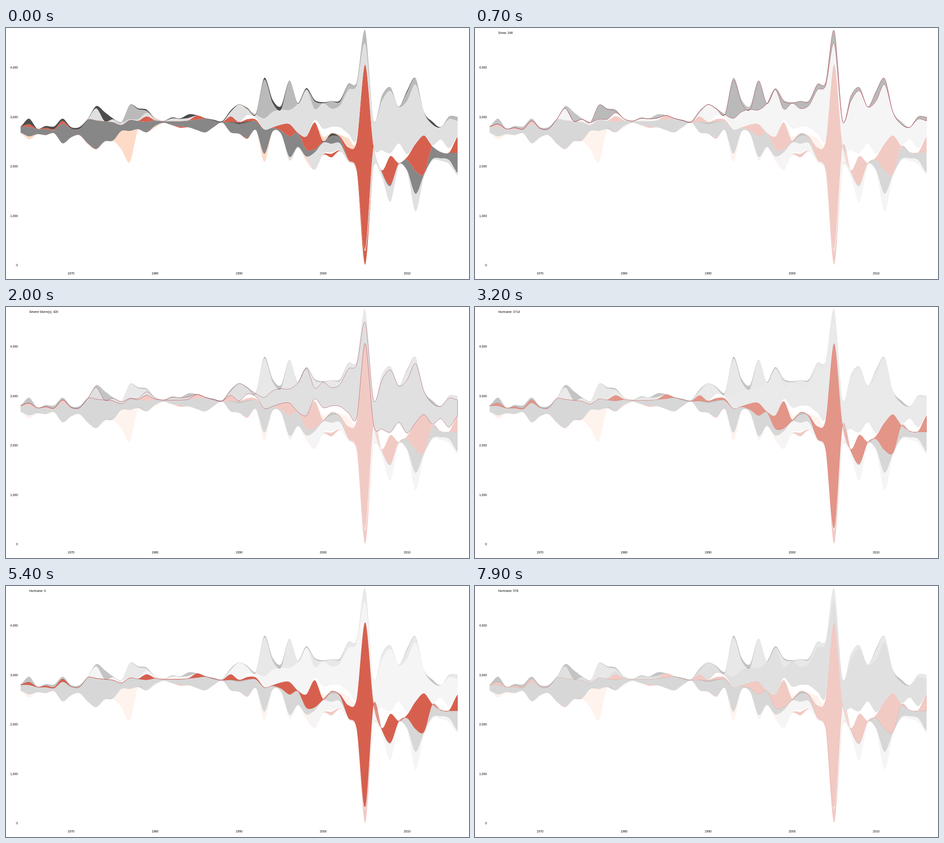
Write an HTML page with a canvas that moves like this. It is 1016 by 551 pixels and loops after 8 s.

```html
<!DOCTYPE html>
<html lang="en">
<head>
<meta charset="utf-8">
<title>Streamgraph</title>
<style>
  html, body { margin: 0; width: 100%; height: 100%; overflow: hidden; background: #fff; }
  canvas { display: block; width: 1016px; height: 551px; }
</style>
</head>
<body>
<canvas id="stage" width="1016" height="551"></canvas>
<script>
const ctx = document.getElementById('stage').getContext('2d');
const LOOP = 8000, FRAME = 100, FADE = 200, DIM = 0.33;
const FIRST = 1964, YEARS = 53, LEFT = 32, STEP = 959 / 52;
const RED = '#d6604d', PEACH = '#fddbc7', WHITE = '#fff', LIGHT = '#e0e0e0';
const SILVER = '#bababa', GRAY = '#878787', DARK = '#4d4d4d';

// Runs of yearly values keyed by their first year; quiet years keep the floor.
function series(runs, floor = 0) {
  const values = Array(YEARS).fill(floor);
  for (const [year, run] of Object.entries(runs))
    run.forEach((v, i) => { values[year - FIRST + i] = Math.max(v, floor); });
  return values;
}

// The edge between the hurricane layer and everything stacked below it.
const spine = series({
  1964: [12, 12, 17, 17, 19, 5, 16, 17, -4, -2, 0, 2, 8, -3, -1, 1, -2],
  1984: [-2, -4, -6, -1, 2, 1, 3],
  1993: [18, 14, 20, 33, 26, 62, 61, 44, 27, 36, 84, 108, 280, 55, 111, 139, 92, 85, 109, 115, 55, 68, 69, 69]
}, -10).map(v => 205 + (v === -10 ? 0 : v));

const below = [
  { color: DARK, depth: series({ 1989: [1, 3, 2], 2000: [2, 5, 1] }) },
  { color: GRAY, depth: series({
    1964: [13, 21, 11, 13, 7, 43, 19, 13, 52, 62, 44, 40, 13, 24, 18, 23, 12, 3, 8, 11, 15, 23, 30],
    1987: [13, 0, 22, 21, 34, 19, 53, 8, 7, 45, 30, 15, 7, 0, 17, 11],
    2007: [2, 3, 1, 23, 50, 2, 28, 13, 16, 44] }, 0.5) },
  { color: LIGHT, depth: series({
    1996: [7, 1, 2, 38, 25, 19, 15, 4, 3, 4, 45, 9, 34, 5, 2, 38, 4, 3, 5, 8, 5] }) },
  { color: WHITE, depth: series({ 2000: [1, 3, 1] }) },
  { color: PEACH, depth: series({ 1965: [6], 1976: [40, 68], 1980: [3], 1993: [17], 1998: [7] }) },
  { color: RED, depth: series({ 1972: [1, 1], 1983: [3], 1991: [2], 2000: [1, 8, 1], 2005: [30] }, 0.2) }
];

const above = [
  { name: 'Hurricane', color: RED, depth: series({
    1965: [6, 0, 3, 2, 6], 1979: [12], 1985: [9],
    1989: [12, 2, 5, 4, 0, 1, 13, 27, 1, 29, 59, 1, 1, 3, 27, 65, 405, 2, 4, 63, 0, 7, 60, 84, 0, 1, 1, 35] }, 0.6) },
  { color: PEACH, depth: series({ 2000: [10, 1, 4, 20] }) },
  { color: WHITE, depth: series({
    1991: [9, 4], 1999: [5, 17, 13, 16, 10, 6], 2007: [44, 6, 43, 6], 2013: [2, 27, 9] }) },
  { name: 'Severe Storm(s)', color: LIGHT, depth: series({
    1973: [26, 0, 6, 5, 1, 3, 8, 3], 1982: [6, 5, 5],
    1989: [10, 38, 13, 7, 24, 34, 33, 31, 64, 103, 24, 56, 40, 48],
    2003: [96, 116, 46, 54, 108, 137, 80, 117, 130, 51, 46, 27, 64, 35] }) },
  { name: 'Snow', color: SILVER, depth: series({
    1977: [31, 22, 4], 1993: [85, 19, 0, 64], 1999: [17, 0, 16, 8, 12, 7, 28, 0, 11, 7, 0, 20, 13], 2015: [5, 8] }) },
  { name: 'Tornado', color: DARK, depth: series({
    1965: [12, 0, 4, 6, 5, 3, 4, 1, 5, 20, 2], 1978: [2, 3], 1982: [2, 1, 8], 1987: [2, 2, 3],
    1991: [2, 2, 4, 7, 8, 0, 1, 3, 3, 2, 0, 3, 1], 2010: [3], 2013: [6] }, 0.4) },
  { color: PEACH, depth: series({ 1980: [3], 1991: [2, 1] }) }
];

// Cardinal spline through the yearly points of one edge.
function curve(path, edge, dir) {
  const last = YEARS - 1, start = dir > 0 ? 0 : last;
  const x = i => LEFT + i * STEP;
  const slope = i => 0.15 * (edge[Math.min(i + 1, last)] - edge[Math.max(i - 1, 0)]);
  const dx = dir * 0.3 * STEP;
  path[dir > 0 ? 'moveTo' : 'lineTo'](x(start), edge[start]);
  for (let i = start, j = i + dir; j >= 0 && j <= last; i = j, j += dir)
    path.bezierCurveTo(x(i) + dx, edge[i] + dir * slope(i),
      x(j) - dx, edge[j] - dir * slope(j), x(j), edge[j]);
}

function stack(items, sign) {
  let edge = spine;
  return items.map(({ name, color, depth }) => {
    const next = edge.map((y, i) => y + sign * depth[i]);
    const path = new Path2D();
    curve(path, edge, 1);
    curve(path, next, -1);
    path.closePath();
    edge = next;
    return { name, color, path };
  });
}

const layers = [...stack(below, 1).reverse(), ...stack(above, -1)];

// Pointer visits; a fade may begin slightly before or after its label.
const hovers = [
  { at: 0, fade: -FADE },
  { at: 500, fade: 500, name: 'Snow', count: 248 },
  { at: 1800, fade: 1800, name: 'Severe Storm(s)', count: 420 },
  { at: 3200, fade: 3100, name: 'Hurricane', count: 3714 },
  { at: 5400, fade: 5400, name: 'Hurricane', count: 0 },
  { at: 5500, fade: 5400, name: 'Severe Storm(s)', count: 1262 },
  { at: 7900, fade: 7900, name: 'Hurricane', count: 578 }
];

const opacity = (hovered, name) => !hovered || hovered === name ? 1 : DIM;

function text(str, x, y, align) {
  ctx.textAlign = align;
  ctx.fillText(str, x, y + 2.4);
}

function drawAxes() {
  for (let v = 0; v <= 4; v++) text(v ? v + ',000' : '0', 26, 520.5 - v * 108.4, 'right');
  for (let year = 1970; year <= 2010; year += 10)
    text(year, LEFT + (year - FIRST) * STEP, 538.5, 'center');
}

function draw(time) {
  const index = hovers.filter(h => h.at <= time).length - 1;
  const now = hovers[index], before = hovers[Math.max(index - 1, 0)];
  const mix = Math.min(1, (time - now.fade) / FADE);

  ctx.globalAlpha = 1;
  ctx.fillStyle = '#fff';
  ctx.fillRect(0, 0, 1016, 551);
  ctx.lineWidth = 0.6;

  for (const { color, path, name } of layers) {
    const from = opacity(before.name, name), to = opacity(now.name, name);
    ctx.globalAlpha = from + (to - from) * mix;
    ctx.fillStyle = color;
    ctx.fill(path);
    if (name && name === now.name) {
      ctx.strokeStyle = color === RED ? '#c94f43' : '#a8303c';
      ctx.stroke(path);
    }
  }

  ctx.globalAlpha = 1;
  ctx.fillStyle = '#000';
  ctx.font = '6.7px "Liberation Sans", Arial, sans-serif';
  drawAxes();
  if (now.name) text(`${now.name}: ${now.count}`, 51, 10.5, 'left');
}

const startTime = performance.now();
function tick() {
  const time = (performance.now() - startTime) % LOOP;
  draw(Math.floor(time / FRAME) * FRAME);
  requestAnimationFrame(tick);
}
tick();
</script>
</body>
</html>
```
